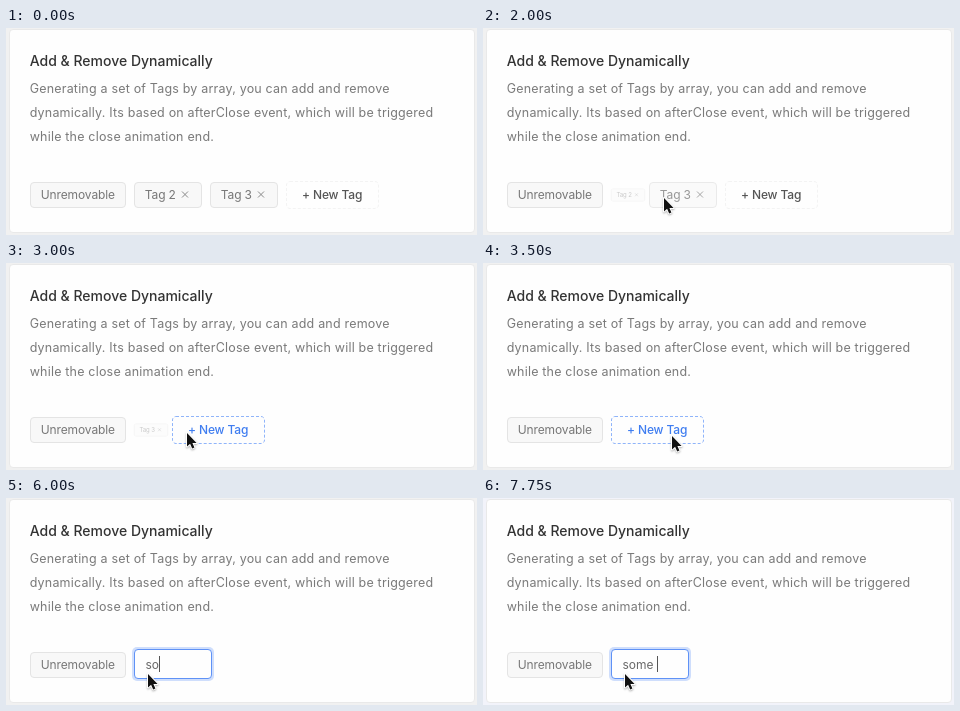
An HTML page with a canvas that plays this animation: 471x207 px, repeating every 8 s.

```html
<!DOCTYPE html>
<html lang="en">
<head>
<meta charset="utf-8">
<title>Dynamic tags</title>
<style>
  html, body { margin: 0; height: 100%; overflow: hidden; background: #f1f1f1; }
  canvas { display: block; }
</style>
</head>
<body>
<canvas id="stage" width="471" height="207"></canvas>
<script>
const ctx = document.getElementById('stage').getContext('2d');
const LOOP = 8000, STEP = 250;
const TAG_TOP = 154, TAG_HEIGHT = 26, GAP = 8;

// Pointer waypoints: time, x, y
const POINTER = [
  [250, 266, 59], [500, 256, 100], [750, 224, 149], [1000, 201, 138], [1250, 229, 127],
  [1500, 203, 150], [1750, 180, 167], [2000, 180, 168], [2500, 194, 169],
  [2750, 181, 168], [3000, 180, 168], [3500, 188, 171], [3750, 172, 173],
  [4000, 153, 174], [4250, 144, 174], [4500, 141, 174],
];
const POINTER_SHAPE = new Path2D('M1 2V15.6L4.1 12.8L6.2 17.4L8.4 16.4L6.4 11.9H10.6Z');

const clamp = v => Math.max(0, Math.min(1, v));

function pointerAt(t) {
  if (t < POINTER[0][0]) return null;
  const i = POINTER.findIndex(p => p[0] > t);
  if (i < 0) return POINTER.at(-1).slice(1);
  const [t0, x0, y0] = POINTER[i - 1], [t1, x1, y1] = POINTER[i];
  const k = (t - t0) / (t1 - t0);
  return [x0 + (x1 - x0) * k, y0 + (y1 - y0) * k];
}

function text(str, x, y, size, color, weight = 400, spacing = 0) {
  ctx.font = `${weight} ${size}px Inter, sans-serif`;
  ctx.letterSpacing = spacing + 'px';
  ctx.fillStyle = color;
  ctx.fillText(str, x, y);
}

function box(x, y, w, h, fill, stroke, dash = []) {
  ctx.beginPath();
  ctx.roundRect(x + .5, y + .5, w - 1, h - 1, 3.5);
  ctx.fillStyle = fill;
  ctx.fill();
  ctx.setLineDash(dash);
  ctx.lineWidth = 1;
  ctx.strokeStyle = stroke;
  ctx.stroke();
  ctx.setLineDash([]);
}

function isOver(pointer, x, w) {
  return pointer && pointer[0] >= x && pointer[0] < x + w
    && pointer[1] >= TAG_TOP && pointer[1] < TAG_TOP + TAG_HEIGHT;
}

// Draws a tag and returns where the next one starts
function tag(label, x, w, size, pointer, closable) {
  if (!size) return x;
  const cx = x + w * size / 2, cy = TAG_TOP + TAG_HEIGHT / 2;
  ctx.save();
  ctx.globalAlpha = size * (closable && isOver(pointer, x, w) ? .75 : 1);
  ctx.translate(cx, cy);
  ctx.scale(size, size);
  ctx.translate(-w / 2, -cy);
  box(0, TAG_TOP, w, TAG_HEIGHT, '#f8f8f8', '#e4e4e4');
  text(label, 10.8, 171, 12, '#777', 400, -.13);
  if (closable) {
    ctx.lineWidth = 1;
    ctx.strokeStyle = '#8a8a8a';
    ctx.stroke(new Path2D('M48 163.5l6 6m0-6l-6 6'));
  }
  ctx.restore();
  return x + (w + GAP) * size;
}

function newTagButton(x, pointer) {
  const active = isOver(pointer, x, 93);
  box(x, TAG_TOP - 1, 93, TAG_HEIGHT + 2, '#fefefe', active ? '#8fb4fa' : '#f3f3f3', [3, 2]);
  text('+ New Tag', x + 16, 171, 12, active ? '#3f7df0' : '#555', 500, -.13);
}

function input(x, t) {
  ctx.beginPath();
  ctx.roundRect(x - 2, 149, 82, 34, 5);
  ctx.fillStyle = t < 5000 ? '#e9f0fe' : '#cfdefc';
  ctx.fill();
  box(x, 151, 78, 30, '#fefefe', '#5f92f6');

  const count = t < 5750 ? 0 : t < 7500 ? Math.min(4, (t - 5500) / STEP) : 5;
  const value = 'some '.slice(0, count);
  text(value, x + 11.5, 171, 12, '#686868');
  const blinkedOff = (t >= 5250 && t < 5750) || (t >= 7000 && t < 7500);
  if (!blinkedOff) {
    const caret = Math.round(x + 11.4 + ctx.measureText(value).width);
    ctx.fillStyle = '#555';
    ctx.fillRect(caret, 158, 1, 16);
  }
}

function drawPointer([x, y]) {
  ctx.save();
  ctx.translate(x, y);
  ctx.lineJoin = 'round';
  ctx.lineWidth = 2;
  ctx.strokeStyle = '#fff';
  ctx.shadowColor = 'rgba(0, 0, 0, .3)';
  ctx.shadowBlur = 2;
  ctx.shadowOffsetY = 1;
  ctx.stroke(POINTER_SHAPE);
  ctx.shadowColor = 'transparent';
  ctx.fillStyle = '#111';
  ctx.fill(POINTER_SHAPE);
  ctx.restore();
}

function draw(t) {
  const pointer = pointerAt(t);
  ctx.fillStyle = t < 7750 ? '#f1f1f1' : '#f2f3fa';
  ctx.fillRect(0, 0, 471, 207);
  box(3, 1, 466, 204, '#fefefe', '#e9e9e9');

  text('Add & Remove Dynamically', 23.7, 38, 14, '#333', 500);
  [
    'Generating a set of Tags by array, you can add and remove',
    'dynamically. Its based on afterClose event, which will be triggered',
    'while the close animation end.',
  ].forEach((line, i) => text(line, 23.7, 65 + i * 24, 12.5, '#7a7a7a', 400, .19));

  let x = tag('Unremovable', 24, 96, 1, pointer, false);
  x = tag('Tag 2', x, 68, clamp((2250 - t) / 500), pointer, true);
  x = tag('Tag 3', x, 68, clamp((3250 - t) / 500), pointer, true);
  if (t < 4750) newTagButton(x, pointer);
  else input(x, t);
  if (pointer) drawPointer(pointer);
}

function frame() {
  const t = performance.now() % LOOP;
  draw(Math.floor(t / STEP) * STEP);
  requestAnimationFrame(frame);
}
frame();
</script>
</body>
</html>
```
